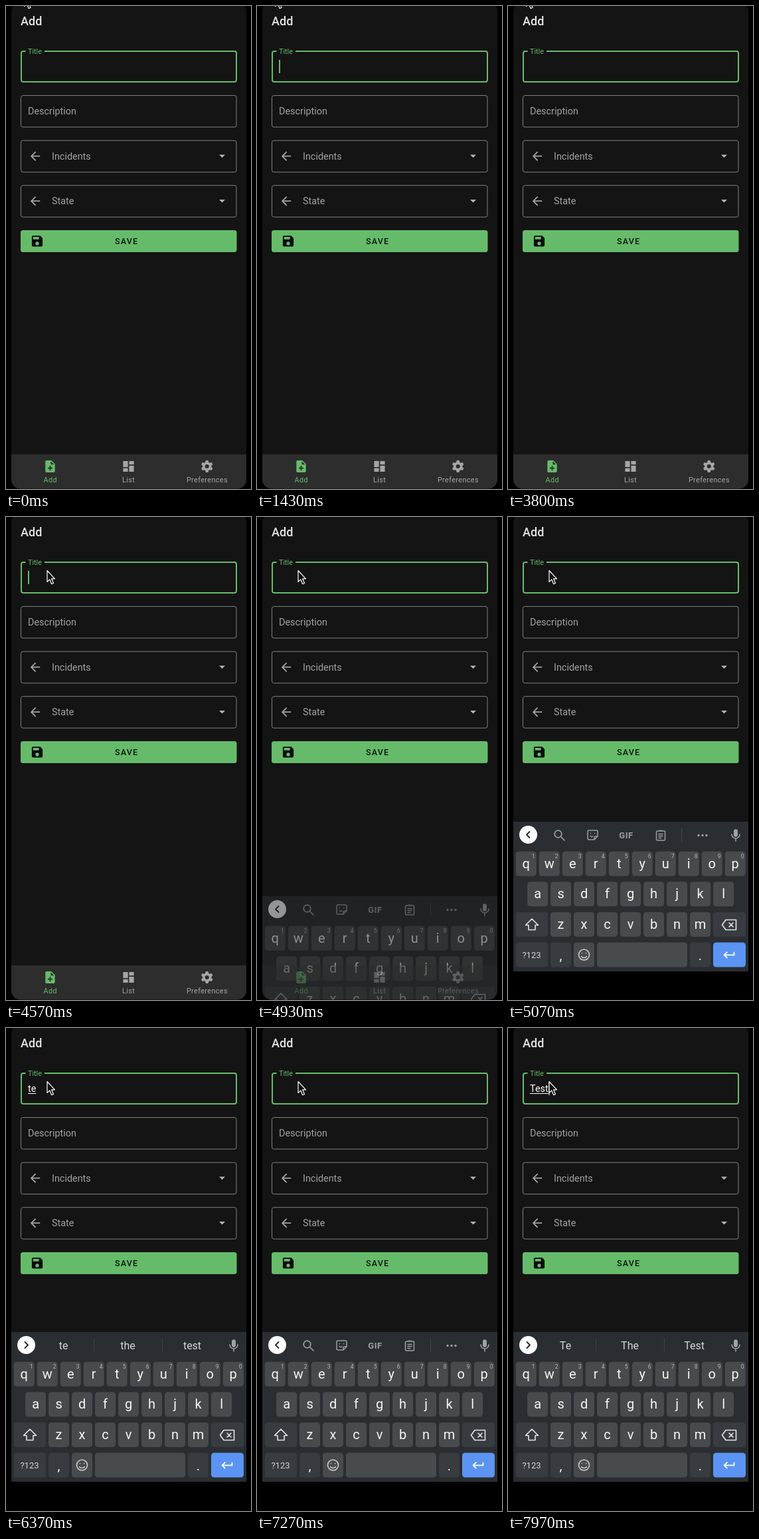
Animation, 369 px wide and 726 px high, one loop 8 s. Source, as an HTML page:

```html
<!DOCTYPE html>
<html lang="en">
<head>
<meta charset="utf-8">
<title>Add form</title>
<style>
  html, body { margin: 0; width: 100%; height: 100%; overflow: hidden; background: #000; }
  svg { display: block; width: 369px; height: 726px; }
  text { font-family: Roboto, sans-serif; white-space: pre; }
  .mid { text-anchor: middle; }
  .field { fill: none; stroke: #808080; }
  .label { font-size: 14.4px; fill: #a2a2a2; }
  .nav { font-size: 10.8px; letter-spacing: .4px; text-anchor: middle; }
  .letter { font-size: 20px; fill: #f4f5f6; text-anchor: middle; }
  .digit { font-size: 8.5px; fill: #b4b7ba; text-anchor: middle; }
  .word { font-size: 16px; fill: #d3d6d9; text-anchor: middle; }
  .line { fill: none; stroke-linecap: round; stroke-linejoin: round; }
</style>
</head>
<body>
<svg id="stage" viewBox="0 0 369 726">
  <defs>
    <clipPath id="screen"><rect x="8" y="-6" width="354" height="731.5" rx="14"/></clipPath>
    <path id="back" d="M20 11H7.83l5.59-5.59L12 4l-8 8 8 8 1.41-1.41L7.83 13H20z"/>
    <path id="drop" d="M7 10l5 5 5-5z"/>
  </defs>
  <g clip-path="url(#screen)">
    <rect width="369" height="726" fill="#141414"/>
    <text x="22" y="29" font-size="18" font-weight="500" fill="#e4e4e4">Add</text>

    <rect x="23" y="68" width="324" height="46" rx="3" fill="none" stroke="#66bb6a" stroke-width="2"/>
    <rect x="29.5" y="65" width="28.5" height="6" fill="#141414"/>
    <text x="33" y="72" font-size="10.8" fill="#66bb6a">Title</text>
    <text id="typed" x="33" y="96" font-size="14.4" fill="#fff"></text>
    <rect id="underline" x="33" y="98" height="1" fill="#fff"/>
    <rect id="caret" y="81" width="2" height="20" fill="#66bb6a"/>

    <g id="fields"></g>

    <rect x="22" y="337" width="325.5" height="33" rx="3.5" fill="#66bb6a"/>
    <path transform="translate(36.2 342.6) scale(.9)" fill="#080808" fill-rule="evenodd"
      d="M17 3H5a2 2 0 0 0-2 2v14a2 2 0 0 0 2 2h14a2 2 0 0 0 2-2V7zM12 19a3 3 0 1 1 0-6 3 3 0 0 1 0 6zM15 9H5V5h10z"/>
    <text x="164" y="358" font-size="12.6" font-weight="500" letter-spacing="1.13" fill="#0c160c">SAVE</text>

    <g id="keyboard">
      <rect x="8" y="457" width="354" height="225" fill="#2a2e32"/>
      <rect x="8" y="682" width="354" height="60" fill="#000"/>
      <circle cx="30.5" cy="476.5" r="13.5" fill="#fff"/>
      <path id="chevron" class="line" stroke="#222" stroke-width="1.8" d="M2-4.5L-2.5 0 2 4.5"/>
      <g class="line" stroke="#a0a4a8" stroke-width="1.5" transform="translate(343 477)">
        <rect x="-2.2" y="-8" width="4.4" height="10" rx="2.2" fill="#a0a4a8"/>
        <path d="M-6-1a6 6 0 0 0 12 0M0 5v4"/>
      </g>
      <g id="tools" class="line" stroke="#9b9fa3" stroke-width="1.7">
        <path d="M80 480l5 5"/><circle cx="75.5" cy="475.5" r="5.3"/>
        <path d="M122 470h11a2 2 0 0 1 2 2v7l-5 5h-8a2 2 0 0 1-2-2v-10a2 2 0 0 1 2-2zM130 484v-3a2 2 0 0 1 2-2h3M124.5 474.5v.2M130.5 474.5v.2M124 478.5q2 2 4 .5" stroke-width="1.5"/>
        <text x="178" y="481.8" class="mid" font-size="13" font-weight="700" letter-spacing=".5" fill="#9b9fa3" stroke="none">GIF</text>
        <path d="M225 471h10a1.5 1.5 0 0 1 1.5 1.5v11a1.5 1.5 0 0 1-1.5 1.5h-10a1.5 1.5 0 0 1-1.5-1.5v-11a1.5 1.5 0 0 1 1.5-1.5zM227.500 470.500h5M227 475.500h6M227 478.500h6M227 481.500h4" stroke-width="1.5"/>
        <path d="M261.500 467v20" stroke="#42464a" stroke-width="1"/>
        <path d="M287 477.500h.01M293 477.500h.01M299 477.500h.01" stroke-width="3.4"/>
      </g>
      <g id="words">
        <path d="M132.500 466v22M235.500 466v22" stroke="#3c4044"/>
        <text class="word" x="86.5" y="483"></text>
        <text class="word" x="183.5" y="483"></text>
        <text class="word" x="280.5" y="483"></text>
      </g>
      <g id="keys"></g>
      <g class="line" stroke="#e2e4e6" stroke-width="1.6">
        <path transform="translate(36 611.500)" d="M0-8.500L9.500 1H5V8H-5V1H-9.500z"/>
        <path transform="translate(333 612)" d="M-10.500 0L-5-7.500H10.500V7.500H-5zM0-3l6 6M6-3l-6 6"/>
        <g transform="translate(114.5 657)" stroke="#c9cbcd">
          <circle r="8"/><path d="M-3-2.500v.3M3-2.500v.3M-4 2.500q4 4 8 0"/>
        </g>
      </g>
      <path transform="translate(322.5 646.5) scale(.9)" fill="#fff" d="M19 7v4H5.830l3.580-3.590L8 6l-6 6 6 6 1.410-1.410L5.830 13H21V7z"/>
    </g>

    <g id="nav">
      <rect x="8" y="674" width="354" height="52" fill="#2d2d2d"/>
      <g fill="#66bb6a">
        <path transform="translate(55.7 681.2) scale(.9)" fill-rule="evenodd"
          d="M14 2H6a2 2 0 0 0-2 2v16a2 2 0 0 0 2 2h12a2 2 0 0 0 2-2V8zM16 16h-3v3h-2v-3H8v-2h3v-3h2v3h3zM13 9V3.500L18.500 9z"/>
        <text class="nav" x="66.7" y="716">Add</text>
      </g>
      <g fill="#a6a6a6">
        <path transform="translate(173.7 681.2) scale(.9)" d="M3 13h8V3H3zM3 21h8v-6H3zM13 21h8V11h-8zM13 3v6h8V3z"/>
        <text class="nav" x="184.700" y="716">List</text>
        <g id="gear" transform="translate(302.700 692) scale(.9)">
          <circle r="5.400" fill="none" stroke="#a6a6a6" stroke-width="4"/>
        </g>
        <text class="nav" x="302.900" y="716">Preferences</text>
      </g>
    </g>
  </g>
  <path id="pointer" d="M0 0V17L3.800 13.400 6.700 20.200 9.500 19 6.600 12.300H11.500z" fill="#111" stroke="#fff" stroke-width="1.200" stroke-linejoin="round"/>
</svg>
<script>
const LOOP = 8000;
const $ = id => document.getElementById(id);
const add = (id, markup) => $(id).insertAdjacentHTML('beforeend', markup);

// Form fields
const field = (y, label, select) => `<rect class="field" x="22.5" y="${y}" width="324.5" height="47.5" rx="3"/>` +
  `<text class="label" x="${select ? 69 : 33}" y="${y + 28.5}">${label}</text>` +
  (select ? `<use href="#back" fill="#a2a2a2" transform="translate(33.200 ${y + 12.7}) scale(.9)"/>` +
    `<use href="#drop" fill="#b4b4b4" transform="translate(314.700 ${y + 12.200}) scale(.9)"/>` : '');
add('fields', field(134.5, 'Description') + field(202.2, 'Incidents', true) + field(269.7, 'State', true));

for (let a = 0; a < 360; a += 60) add('gear', `<path transform="rotate(${a})" d="M-3-6L-2-10H2L3-6z"/>`);

// Keyboard
const LIGHT = '#484b4e', DARK = '#383c40';
const key = (x, y, w, fill = LIGHT) => `<rect x="${x}" y="${y}" width="${w}" height="37" rx="4.5" fill="${fill}"/>`;
['qwertyuiop', 'asdfghjkl', 'zxcvbnm'].forEach((row, r) => {
  const y = 501.7 + r * 45.6;
  [...row].forEach((c, i) => {
    const x = [11.7, 29.1, 64][r] + i * 35;
    add('keys', key(x, y, 31) + `<text class="letter" x="${x + 15.5}" y="${y + 24.8}">${c}</text>`);
    if (!r) add('keys', `<text class="digit" x="${x + 26.5}" y="${y + 10.5}">${(i + 1) % 10}</text>`);
  });
});
add('keys', key(11.7, 593, 48.5, DARK) + key(309, 593, 49, DARK) +
  key(11.7, 638.5, 48.5, DARK) + key(64, 638.5, 31, DARK) + key(99, 638.5, 31) +
  key(134, 638.5, 136) + key(274, 638.5, 31, DARK) + key(309, 638.5, 49, '#5b94f3') +
  '<text class="mid" x="35.500" y="662" font-size="13" fill="#d0d2d4">?123</text>' +
  '<text class="letter" x="79.500" y="665">,</text><text class="letter" x="289.500" y="665">.</text>');

// Each track lists [start time, value...]; a value holds until the next start.
const caretTrack = [0, 370, 830, 1430, 1800, 2330, 2830, 3330, 3800, 4230, 4870, 5330, 6370, 6570, 7270, 7470]
  .map((at, i) => [at, i % 2]);
const textTrack = [[0, ''], [5530, 't'], [5700, 'te'], [6570, 't'], [6730, ''],
  [7470, 'T'], [7670, 'Te'], [7870, 'Tes'], [7970, 'Test']];
const wordTrack = [[0, ''], [5700, "t the that's"], [5900, 'te the test'], [6730, "t the that's"], [6870, ''],
  [7670, "T The That's"], [7930, 'Te The Test']];
const pointerTrack = [[0, 27.5, -16.5], [4230, 31, 3], [4300, 43, 46], [4370, 57, 82], [4430, 61.5, 90], [4570, 62, 80.5]];
const slideTrack = [[0, 260, 0], [4870, 195, .12], [4930, 113, .55], [5000, 20, .95], [5070, 1, 1], [5130, 0, 1]];
const valueAt = (track, t) => track.findLast(step => step[0] <= t).slice(1);

const words = document.querySelectorAll('.word');
const show = (id, on) => $(id).style.display = on ? '' : 'none';

function render(t) {
  const [text] = valueAt(textTrack, t), [caret] = valueAt(caretTrack, t);
  $('typed').textContent = text;
  const width = text ? $('typed').getComputedTextLength() : 0;
  $('underline').setAttribute('width', width);
  $('caret').setAttribute('x', 33 + Math.round(width));
  show('caret', caret);

  const [line] = valueAt(wordTrack, t);
  show('words', line);
  show('tools', !line);
  line.split(' ').forEach((w, i) => words[i].textContent = w);
  $('chevron').setAttribute('transform', `translate(30.5 476.5) scale(${line ? -1 : 1} 1)`);

  const [x, y] = valueAt(pointerTrack, t);
  $('pointer').setAttribute('transform', `translate(${x} ${y})`);

  const [offset, alpha] = valueAt(slideTrack, t);
  $('keyboard').setAttribute('transform', `translate(0 ${offset})`);
  $('keyboard').setAttribute('opacity', alpha);
  $('nav').setAttribute('opacity', alpha > .5 ? Math.max(0, .95 - alpha) : 1 - alpha);
}

const start = performance.now();
function tick() {
  render((performance.now() - start) % LOOP);
  requestAnimationFrame(tick);
}
tick();
</script>
</body>
</html>
```
